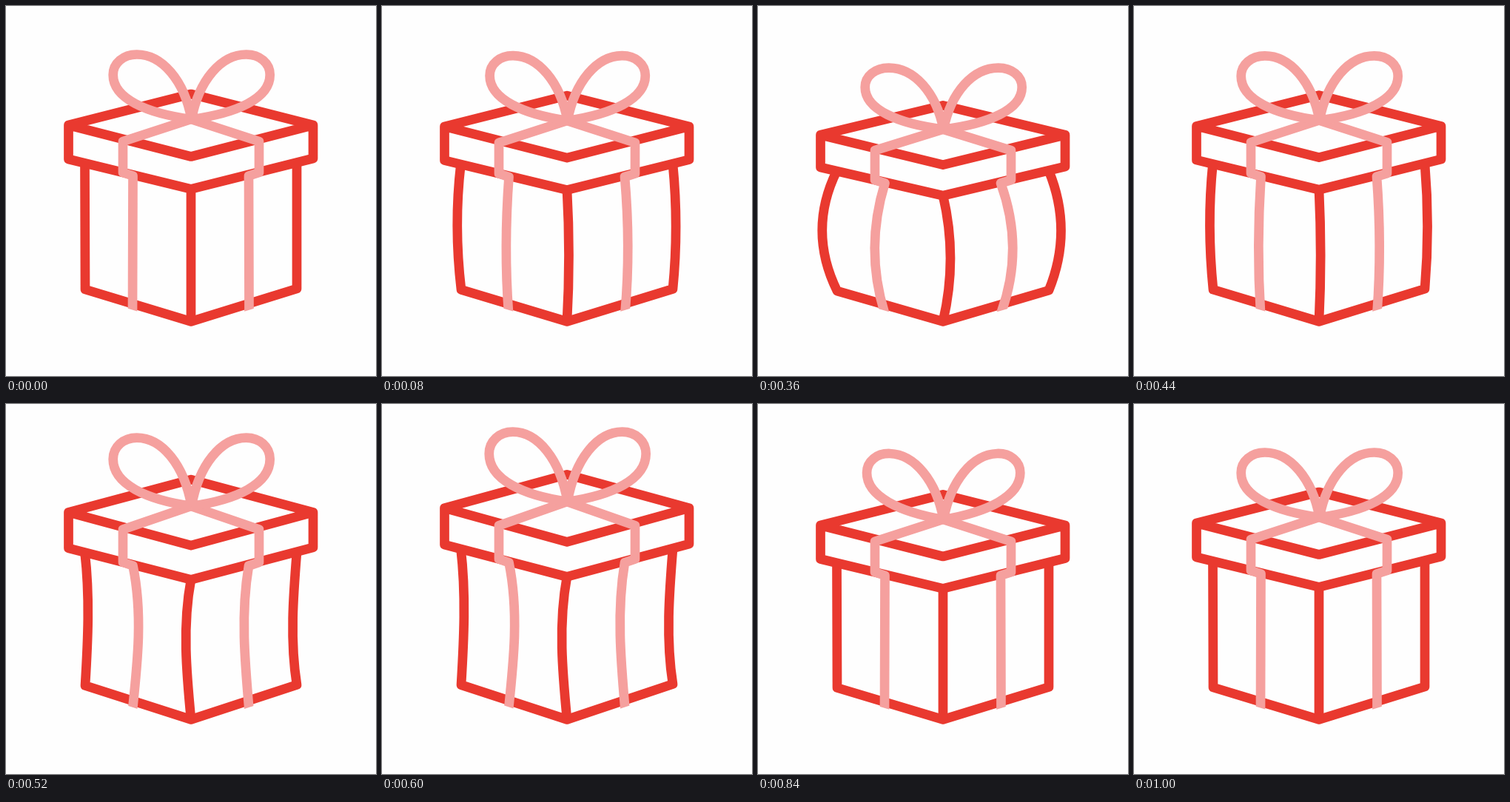
Write an HTML page that moves like this. It is 500x500 px and loops after 1080 ms.

```html
<!DOCTYPE html>
<html lang="en">
<head>
<meta charset="utf-8">
<title>Gift box</title>
<style>
  html, body { margin: 0; width: 100%; height: 100%; overflow: hidden; background: #fefefe; }
  svg { display: block; width: 100vw; height: 100vh; }
  path { fill: none; stroke-width: 12.7; stroke-linejoin: round; vector-effect: non-scaling-stroke; }
  .red { stroke: #e9392f; }
  .pink { stroke: #f5a09e; }
</style>
</head>
<body>
<svg viewBox="0 0 500 500">
  <clipPath id="hem"><path d="M0 -50H500V359L250 434.5L0 359Z"/></clipPath>
  <g id="gift">
    <path id="walls" class="red"/>
    <path id="edge" class="red"/>
    <path class="red" d="M84.5 161L250 119L415 161V206L250 247.3L84.5 207ZL250 203.5L415 161"/>
    <g clip-path="url(#hem)">
      <path id="ribbonL" class="pink"/>
      <path id="ribbonR" class="pink"/>
    </g>
    <path id="bow" class="pink"/>
  </g>
</svg>
<script>
const LOOP = 1080, STEP = 40, LAST = 1000, FLOOR = 427;
const el = id => document.getElementById(id);

// Eased passage from 0 to 1 between two times.
const ease = (t, from, to) => {
  const u = Math.min(1, Math.max(0, (t - from) / (to - from)));
  return (1 - Math.cos(Math.PI * u)) / 2;
};
const pulse = (t, from, peak, to) => ease(t, from, peak) - ease(t, peak, to);

// Squash, leap, small dip, rest.
const stretch = t => 1 - .053 * ease(t, 0, 335) + .131 * ease(t, 335, 590)
  - .095 * ease(t, 590, 735) + .017 * ease(t, 735, LAST);
// Positive swells the walls, negative pinches them.
const swell = t => ease(t, 0, 240) - 2.08 * ease(t, 360, 550) + 1.08 * ease(t, 550, 790);
// The bow perks up while the box sinks.
const perk = t => pulse(t, 40, 200, 360) + .65 * pulse(t, 590, 750, 960);

// Upright curve between two points; "out" and "pinch" are its full sideways swings.
function side([x0, y0], [x1, y1], bulge, out, pinch) {
  const [a, b] = bulge > 0 ? [out * 4 / 3, out * 4 / 3] : [-pinch * 1.65, -pinch * .85];
  const h = (y1 - y0) / 3;
  return `C${x0 + a * bulge} ${y0 + h} ${x1 + b * bulge} ${y1 - h} ${x1} ${y1}`;
}

function bowPath(lift) {
  const loop = dir => {
    const p = (x, y) => `${250.7 + dir * x * (1 - .056 * lift)} ${153 - y - .088 * x * lift} `;
    return 'M' + p(0, 0) + 'C' + p(10, 53) + p(40, 87.5) + p(74, 87.5)
      + 'C' + p(92, 87.5) + p(106, 76) + p(106, 60)
      + 'C' + p(106, 28) + p(61, 8) + p(0, 0);
  };
  return loop(-1) + loop(1);
}

function draw(t) {
  const s = stretch(t), b = swell(t);
  el('gift').setAttribute('transform', `matrix(1 0 0 ${s} 0 ${FLOOR * (1 - s)})`);
  const set = (id, d) => el(id).setAttribute('d', d);
  set('walls', 'M106.5 212' + side([106.5, 212], [107, 383], b, -20, 4.5)
    + 'L250 426.4L393 382' + side([393, 382], [393, 212], b, 16.5, -6));
  set('edge', 'M250 247' + side([250, 247], [250, 426], b, 10, -7.5));
  set('ribbonL', 'M250 153L158 183V225L171.5 229.5'
    + side([171.5, 229.5], [171, 414], b, -13.5, 8.5));
  set('ribbonR', 'M250 153L342 183V225L328 229.5'
    + side([328, 229.5], [328.5, 414], b, 16, -7));
  set('bow', bowPath(perk(t)));
}

const start = performance.now();
function tick() {
  const t = (performance.now() - start) % LOOP;
  draw(Math.min(LAST, Math.floor(t / STEP) * STEP));
  requestAnimationFrame(tick);
}
tick();
</script>
</body>
</html>
```
